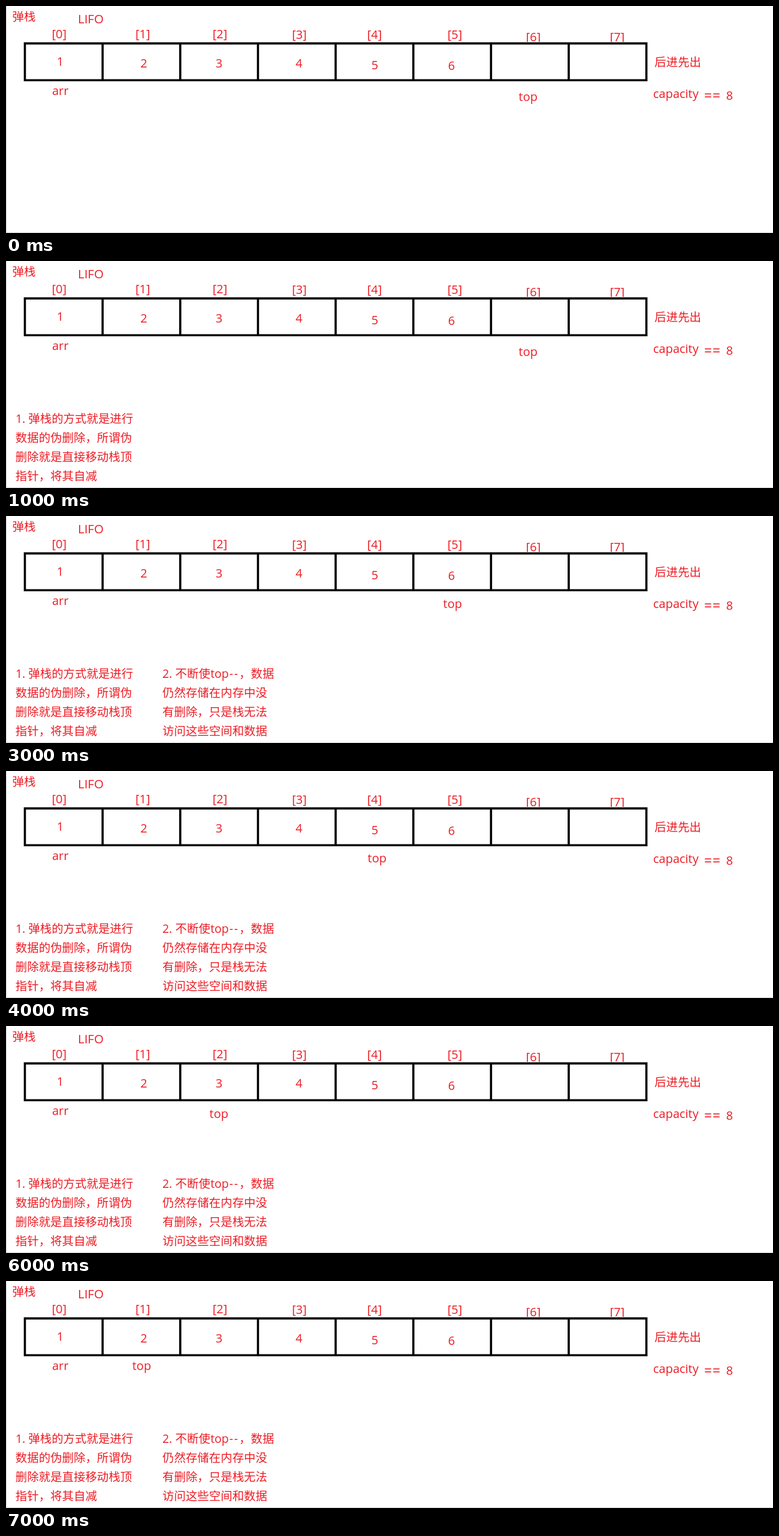
An HTML page that plays this animation: 1280 px wide and 380 px high, repeating every 8 s.

```html
<!DOCTYPE html>
<html lang="zh-CN">
<head>
<meta charset="utf-8">
<title>弹栈</title>
<style>
  html, body { margin: 0; width: 100%; height: 100%; overflow: hidden; background: #fff; }
  svg { display: block; width: 100%; height: 100%; }
  text {
    font-family: "Open Sans", "Noto Sans CJK SC", "Noto Sans CJK", sans-serif;
    font-size: 20px;
    fill: #ed1c24;
    white-space: pre;
  }
  .zh { font-size: 19.45px; }
  .mid { text-anchor: middle; }
  .eq { font-size: 23px; }
  .lifo { font-size: 20.5px; }
  .cells { fill: none; stroke: #000; stroke-width: 3.6; }
  .edge { fill: none; stroke: #d0d0d0; }

  .top, .note { animation: 8s step-end infinite; }
  .top { animation-name: pop; }
  .first { animation-name: first; }
  .second { animation-name: second; }

  @keyframes pop {
    0%    { transform: translate(855.6px, 159px); }
    25%   { transform: translate(729.6px, 154px); }
    50%   { transform: translate(603.6px, 153px); }
    62.5% { transform: translate(472px, 153px); }
    75%   { transform: translate(339.6px, 154px); }
    87.5%, 100% { transform: translate(210.8px, 149px); }
  }
  @keyframes first {
    0% { visibility: hidden; }
    12.5%, 100% { visibility: visible; }
  }
  @keyframes second {
    0% { visibility: hidden; }
    37.5%, 100% { visibility: visible; }
  }
</style>
</head>
<body>
<svg viewBox="0 0 1280 380" preserveAspectRatio="none">
  <defs>
    <clipPath id="above"><rect width="1280" height="60"/></clipPath>
  </defs>
  <path class="edge" d="M.5 0V379.5H1280"/>

  <text class="zh" x="10.5" y="25.2">弹栈</text>
  <text class="lifo" x="120" y="29">LIFO</text>

  <g class="mid" clip-path="url(#above)">
    <text x="88.7" y="53.7">[0]</text>
    <text x="228.2" y="53.7">[1]</text>
    <text x="357" y="53.7">[2]</text>
    <text x="489.5" y="54.5">[3]</text>
    <text x="615" y="55">[4]</text>
    <text x="749" y="55">[5]</text>
    <text x="880" y="58.7">[6]</text>
    <text x="1020" y="58.7">[7]</text>
  </g>

  <path class="cells" d="M31.5 62.6H1068.7V124.2H31.5Z M161.2 62V124 M290.8 62V124 M420.5 62V124 M550.1 62V124 M679.8 62V124 M809.4 62V124 M939.1 62V124"/>

  <g class="mid">
    <text x="90.5" y="100">1</text>
    <text x="230" y="102.5">2</text>
    <text x="355.5" y="102.5">3</text>
    <text x="489" y="103">4</text>
    <text x="615.5" y="106">5</text>
    <text x="743.5" y="106.5">6</text>
  </g>

  <text x="77" y="149">arr</text>
  <text class="top">top</text>

  <text class="zh" x="1082.3" y="101.2">后进先出</text>
  <text x="1080" y="154">capacity</text>
  <text class="eq" y="158.2"><tspan x="1165">=</tspan><tspan x="1179">=</tspan></text>
  <text class="mid" x="1207.5" y="157">8</text>

  <g class="note first">
    <text class="zh" y="270.8"><tspan x="16">1.</tspan><tspan x="37.3">弹栈的方式就是进行</tspan></text>
    <text class="zh" x="15.8" y="302.7">数据的伪删除，所谓伪</text>
    <text class="zh" x="15.8" y="334.6">删除就是直接移动栈顶</text>
    <text class="zh" x="15.8" y="366.5">指针，将其自减</text>
  </g>

  <g class="note second">
    <text class="zh" y="270.8"><tspan x="261">2.</tspan><tspan x="282.5">不断使</tspan><tspan x="341.2">top</tspan><tspan x="372.8">-</tspan><tspan x="380.8">-</tspan><tspan x="389">，数据</tspan></text>
    <text class="zh" x="261" y="302.7">仍然存储在内存中没</text>
    <text class="zh" x="261" y="334.6">有删除，只是栈无法</text>
    <text class="zh" x="261" y="366.5">访问这些空间和数据</text>
  </g>
</svg>
</body>
</html>
```
